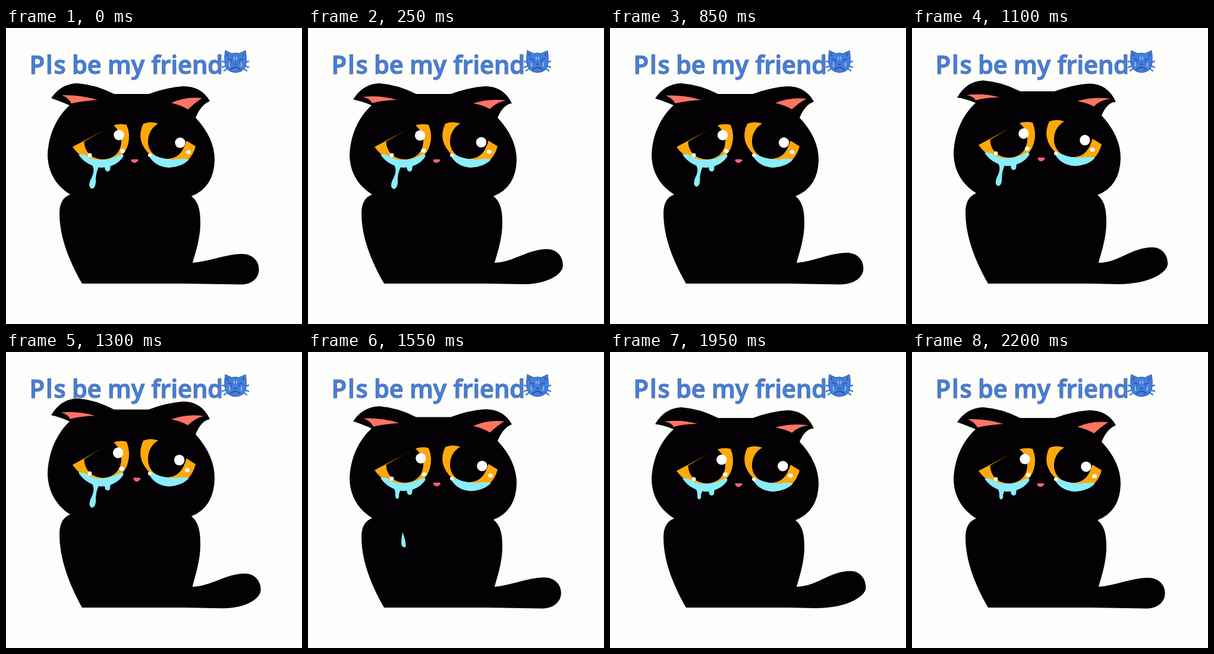
These frames come from a looping animation (498 by 498 pixels, 2.25 s). An HTML page:

```html
<!DOCTYPE html>
<html lang="en">
<head>
<meta charset="utf-8">
<title>Sad cat</title>
<style>
  html, body { margin: 0; width: 100%; height: 100%; overflow: hidden; background: #fdfefc; }
  svg { display: block; width: 100vw; height: 100vh; }
  .title { font: 600 41.5px "Open Sans", "Noto Sans", sans-serif; fill: #427fe0; stroke: #59637a; stroke-width: 1.3; paint-order: stroke; }
  .black { fill: #030104; }
  .orange { fill: #ffa80b; }
  .tear { fill: #8aedfb; }
  .ear { fill: #ff7363; }
  .white { fill: #fff; }
</style>
</head>
<body>
<svg viewBox="0 0 498 498">
  <g class="title">
    <text x="39.5" y="76.5" letter-spacing="2">Pls</text>
    <text x="111" y="76.5">be</text>
    <text x="171" y="76.5">my</text>
    <text x="244.5" y="76.5">friend</text>
  </g>

  <g stroke="#34548f" stroke-linecap="round" stroke-linejoin="round">
    <path fill="none" stroke="#427fe0" stroke-width="2.4" d="M370 58L364 56M370 64L364 66M371 69L367 72M402 58L408 56M402 64L408 66M401 69L405 72"/>
    <path fill="#427fe0" d="M369 38L380 43Q386 41 392 43L403 38Q405 48 404 57Q404 74 386 75Q369 74 368 57Q367 47 369 38Z"/>
    <path fill="none" stroke="#a9c8f4" stroke-width="1.6" d="M376 58V65M396 58V65M384 49V53M388 49V53"/>
    <path fill="none" stroke-width="1.8" d="M374 52L380 54M398 52L392 54M379 57V58M393 57V58M384 61H388M378 70Q386 62 394 70M372 43L373 47M400 43L399 47"/>
  </g>

  <path id="tail" class="black"/>
  <g id="cat">
    <path id="body" class="black"/>
    <path id="earL" class="ear"/>
    <path id="earR" class="ear"/>

    <path class="orange" d="M112 200L180 164Q192 160 203 163Q210 180 205 197Q198 222 165 227Q130 226 112 200Z"/>
    <path class="black" d="M131.500 191C132 209 145 221 164 221C184 220 194 206 194 190C194 178 188 170 180 163Z"/>
    <path class="orange" d="M231 161Q243 156 257 161L319 199Q315 214 306 222Q270 238 243 214Q217 190 231 161Z"/>
    <path class="black" d="M257.500 160C244 167 238 180 239 194C241 211 255 220 270 220C288 220 298 210 304 188Z"/>

    <path class="tear" d="M122 213Q130 210 140 218Q165 228 192 213Q199 211 197 217Q185 234 160 235Q135 232 122 213Z"/>
    <path class="tear" d="M239 212Q245 211 251 215Q268 222 285 221Q300 219 308 221Q298 233 274 235Q248 233 239 212Z"/>
    <path id="drip" class="tear"/>
    <path class="tear" d="M165 230L167 239Q171 244 175 239L176 230Z"/>

    <g class="white">
      <circle id="shineL" r="8.7"/>
      <circle id="shineR" r="8.7"/>
      <ellipse id="dotL" rx="4" ry="3.4"/>
      <ellipse id="dotR" rx="4" ry="3.4"/>
      <circle cx="141" cy="214" r="3.4"/>
      <circle cx="242" cy="214" r="3"/>
    </g>
    <path id="nose" fill="#f25f80" d="M210 222Q213 220 216 221Q220 220 223 222Q220 227 216 227Q212 227 210 222Z"/>
  </g>
  <path id="drop" class="tear" d="M0 0Q-3 17 -1.500 22Q1 27 5 25Q7 18 0 0Z"/>
</svg>
<script>
const LOOP = 2250, STEP = 50, SWAY = 750;
const FLOOR = 430, HEAD_TOP = 93;
const RISE = { peak: 1300, half: 320, height: 15 };

// Length of the hanging tear over time, 0 short to 1 long
const DRIP = [[0, .97], [250, 1], [310, 1], [330, 0], [650, 0], [850, .83],
              [1300, .92], [1370, 1], [1390, 0], [LOOP, 0]];
const FALLS = [310, 1370], FALL_TIME = 300;

const el = id => document.getElementById(id);
const mix = (a, b, k) => a + (b - a) * k;
const ease = p => (1 - Math.cos(Math.PI * p)) / 2;

function sample(keys, t) {
  const i = Math.max(1, keys.findIndex(key => key[0] >= t));
  const [t0, a] = keys[i - 1], [t1, b] = keys[i];
  return mix(a, b, (t - t0) / (t1 - t0));
}

// Blends two paths that share the same commands
function morph(id, from, to, k) {
  const end = to.match(/[\d.]+/g);
  let i = 0;
  el(id).setAttribute('d', from.replace(/[\d.]+/g, n => mix(+n, +end[i++], k).toFixed(2)));
}

function place(id, x0, y0, x1, y1, k) {
  el(id).setAttribute('cx', mix(x0, x1, k));
  el(id).setAttribute('cy', mix(y0, y1, k));
}

// Slow rise, quicker fall, slightly past the raised pose
function sway(t) {
  const low = 735, up = 430;
  const p = (t - low + SWAY) % SWAY;
  return 1.12 * (p < up ? ease(p / up) : ease((SWAY - p) / (SWAY - up)));
}

// One stretch of the whole body per loop
function lift(t) {
  const d = Math.abs(t - RISE.peak) / RISE.half;
  return d < 1 ? RISE.height * ease(1 - d) : 0;
}

const bodyPath = (tipL, tipR) =>
  `M76 ${tipL}Q92 94 120 93Q150 95 182 111L240 111Q270 100 298 98Q329 98 343 ${tipR}` +
  'Q328 129 319 151Q351 185 351 222Q350 268 312 283C325 293 327 310 327 328' +
  'C327 355 318 380 314 395L318 430L128 430C105 390 90 350 90 312' +
  'C90 296 95 285 108 280C87 267 71 246 70 215C71 180 85 150 107 130Q90 123 76 ' + tipL + 'Z';

function draw(t) {
  const k = sway(t);

  morph('tail',
    'M300 396L314 395C340 393 368 381 396 380C414 380 425.5 391 425.5 406C425.5 422 412 432 395 431.5L300 430Z',
    'M300 396L314 395C349 394 368 370 404 369.5C420 369.5 430 382 430 397C430 412 400 431 350 431L300 430Z', k);
  morph('body', bodyPath(118, 123), bodyPath(121, 128), k);
  morph('earL',
    'M94 113Q125 112 154 121Q128 123 110 127Q106 118 94 113Z',
    'M92 117Q120 113 148 121Q125 121 107 126Q104 119 92 117Z', k);
  morph('earR',
    'M278 126Q302 115 330 118Q319 125 306 137Q295 130 278 126Z',
    'M278 127Q305 119 334 123Q317 125 306 136Q295 130 278 127Z', k);
  place('shineL', 190, 180, 188, 181, k);
  place('shineR', 293, 193, 291, 192, k);
  place('dotL', 196, 207, 194, 206, k);
  place('dotR', 307, 209, 304, 208, k);

  morph('drip',
    'M145 231Q147 236 147 240Q146 247 150 248Q154 247 153 241Q154 237 156 232Z',
    'M145 231Q151 240 142 256Q137 268 144 271Q150 271 151 260Q150 245 157 232Z', sample(DRIP, t));

  const rise = lift(t);
  const stretch = 1 + rise / (FLOOR - HEAD_TOP);
  el('cat').setAttribute('transform', `translate(0 ${FLOOR * (1 - stretch)}) scale(1 ${stretch})`);
  el('nose').setAttribute('transform', `translate(${rise * .26} 0)`);

  const start = FALLS.find(s => t > s && t < s + FALL_TIME);
  const drop = el('drop');
  drop.style.display = start === undefined ? 'none' : '';
  if (start !== undefined) {
    const u = t - start;
    const x = mix(146, 159, Math.min(1, u / 160));
    const y = 240 + 63 * (u / 180) ** 1.3;
    const size = Math.min(1, (FALL_TIME - u) / 60);
    drop.setAttribute('transform', `translate(${x} ${y}) scale(${size})`);
  }
}

const begin = performance.now();
function tick() {
  const t = (performance.now() - begin) % LOOP;
  draw(Math.floor(t / STEP) * STEP);
  requestAnimationFrame(tick);
}
tick();
</script>
</body>
</html>
```
